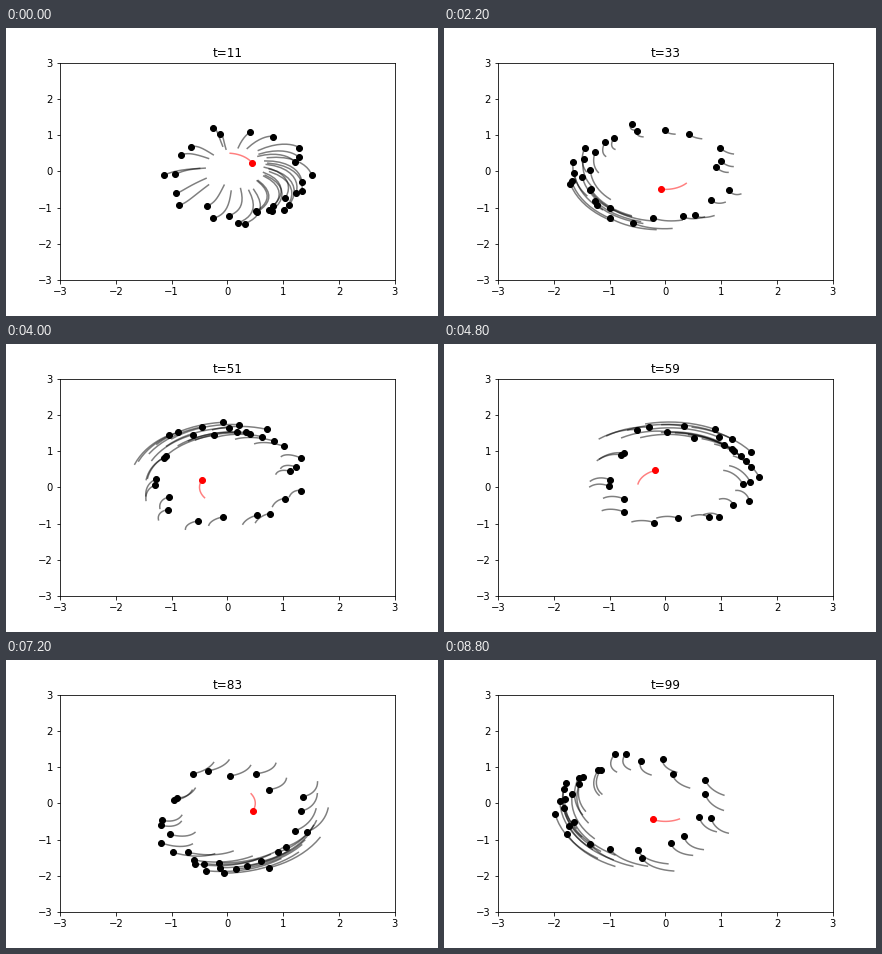
A matplotlib script for the animation above (8900 ms loop, 432 by 288 pixels).

```python
import numpy as np
import matplotlib.pyplot as plt
from matplotlib.animation import FuncAnimation

FIRST, LAST, TRAIL = 11, 99, 10
COUNT = 30
SPIN = 0.1       # leader's turn per step, clockwise from the top
DRIFT = 0.035    # slower turn of the flock's ring
BUNCH = 0.6      # how tightly the ring crowds on one side

rng = np.random.default_rng(4)
slot = 2 * np.pi * np.arange(COUNT) / COUNT + rng.normal(0, 0.06, COUNT)
reach = 1.28 + rng.uniform(-0.2, 0.2, COUNT)


def clock(angle, radius):
    """Point at an angle measured clockwise from the top."""
    return np.array([radius * np.sin(angle), radius * np.cos(angle)])


def leader(t):
    return clock(SPIN * t, 0.5)


def flock(t):
    """Ring that opens up, turns, and crowds ahead of the leader."""
    crowd = SPIN * t + 1.4
    angle = slot + DRIFT * (t - 13)
    angle = angle - BUNCH * np.sin(angle - crowd)
    opening = 1 - 0.55 * np.exp(-(t - 1) / 5)
    centre = clock(SPIN * t + 1, 0.15 + 0.004 * t)
    return centre[:, None] + clock(angle, reach * opening)


fig, ax = plt.subplots(figsize=(6, 4), dpi=72)
fig.subplots_adjust(left=0.125, right=0.9, bottom=0.125, top=0.88)
ax.set(xlim=(-3, 3), ylim=(-3, 3))
title = ax.set_title("")
tails = [ax.plot([], [], "k-", alpha=0.5)[0] for _ in range(COUNT)]
dots, = ax.plot([], [], "ko")
red_tail, = ax.plot([], [], "r-", alpha=0.5)
red_dot, = ax.plot([], [], "ro")


def draw(i):
    t = FIRST + i
    steps = np.arange(t - TRAIL, t + 1)
    recent = np.array([flock(s) for s in steps])
    for n, tail in enumerate(tails):
        tail.set_data(recent[:, 0, n], recent[:, 1, n])
    dots.set_data(*recent[-1])
    x, y = leader(steps)
    red_tail.set_data(x, y)
    red_dot.set_data(x[-1:], y[-1:])
    title.set_text(f"t={t}")
    return [*tails, dots, red_tail, red_dot, title]


anim = FuncAnimation(fig, draw, frames=LAST - FIRST + 1, interval=100,
                     repeat=True, repeat_delay=0)
plt.show()
```
